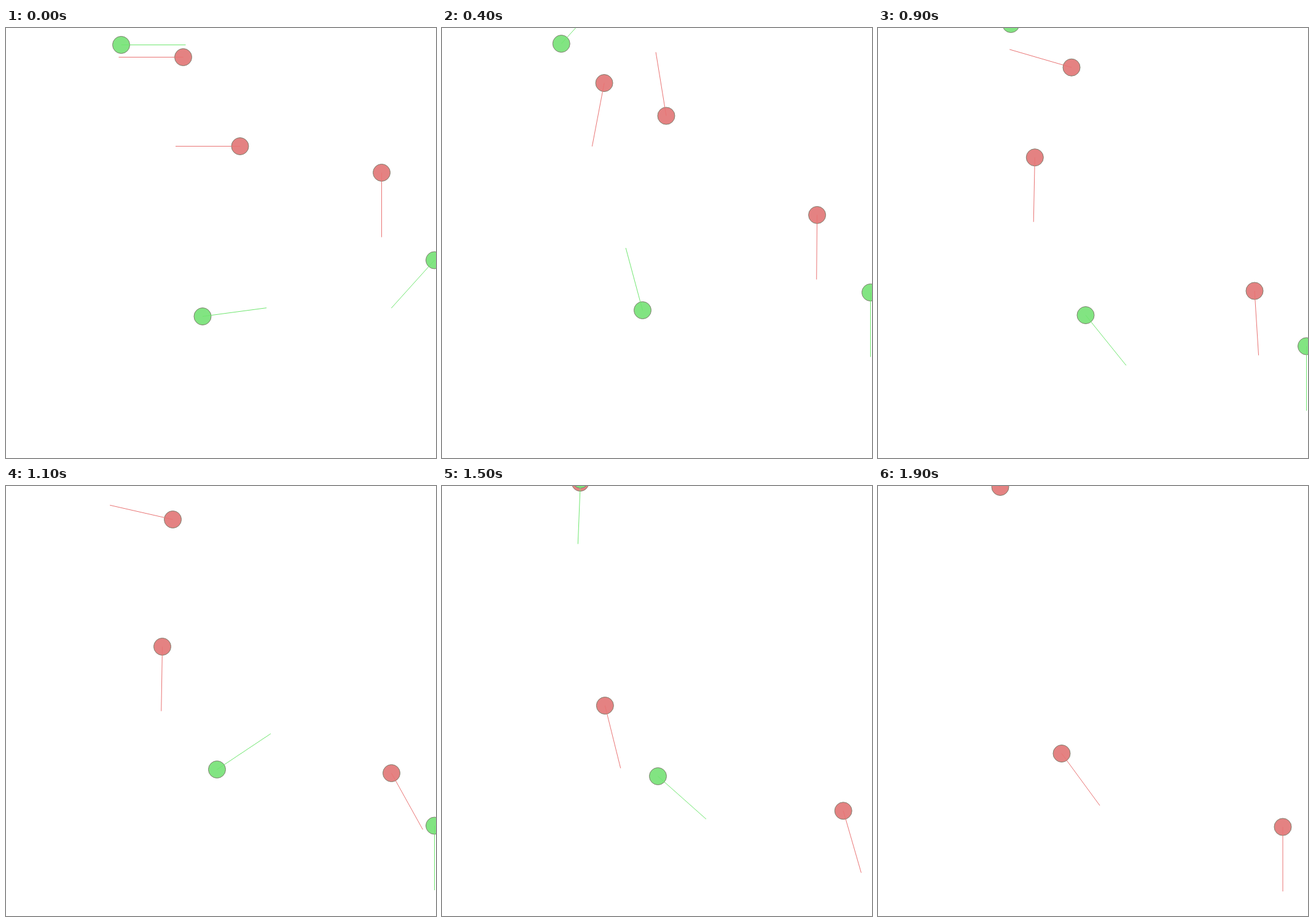
Write an HTML page with a canvas that moves like this. It is 700 px wide and 700 px high and loops after 2000 ms.

```html
<!DOCTYPE html>
<html lang="en">
<head>
<meta charset="utf-8">
<title>Pursuit</title>
<style>
  html, body { margin: 0; width: 100%; height: 100%; overflow: hidden; background: #fff; }
  canvas { display: block; }
</style>
</head>
<body>
<canvas id="stage" width="700" height="700"></canvas>
<script>
const ctx = document.getElementById('stage').getContext('2d');
const STEP_MS = 100, STEPS = 20, RADIUS = 14, SIGHT = 105;
const RED = { fill: '#e48282', line: '#e97474' };
const GREEN = { fill: '#82e482', line: '#70e670' };

// A key point: where an agent is at a step and how far it moves per step.
const at = (step, x, y, vx, vy) => ({ step, x, y, vx, vy });

// Hunters come first, so that the hunted are drawn over them.
const agents = [
  { color: RED, last: 19, path: [
    at(0, 288, 47, -9, 0), at(11, 254, 261, -0.4, 24), at(19, 298.5, 435, 11, 15)] },
  { color: RED, last: 19, path: [
    at(0, 380.5, 192, -6, 0), at(6, 356.5, 100, -5, -21), at(11, 271, 54, -22, -5),
    at(15, 224.5, -6, -1, -9), at(19, 198.5, 1, -6, -3)] },
  { color: RED, last: 19, path: [
    at(0, 611, 235, 0, 10), at(9, 612.5, 427.5, 1.5, 24), at(11, 627, 467, 10, 18),
    at(19, 658.5, 554.5, 0, 0.5)] },
  { color: GREEN, last: 15, path: [
    at(0, 187, 27, 3, 0), at(6, 201.5, 16, 6, -7), at(15, 225, -11, -0.4, 10)] },
  { color: GREEN, last: 17, path: [
    at(0, 319.5, 469, 3, -0.4), at(4, 326, 459, -0.7, -2.6), at(9, 337.5, 467, 2.5, 3.1),
    at(11, 343, 461, 3, -2), at(15, 351, 472, 2.7, 2.4)] },
  { color: GREEN, last: 12, path: [
    at(0, 697, 377.5, -0.9, 1), at(4, 697, 430, 0, 17.5)] },
];

// Position and speed on the cubic between two values with given end speeds.
function cubic(p0, p1, v0, v1, span, u) {
  const w = 1 - u;
  return [
    w * w * (1 + 2 * u) * p0 + u * u * (3 - 2 * u) * p1 + span * u * w * (w * v0 - u * v1),
    6 * u * w * (p1 - p0) / span + w * (1 - 3 * u) * v0 + u * (3 * u - 2) * v1
  ];
}

function poseAt(path, step) {
  const next = path.findIndex(key => key.step > step);
  if (next < 0) {
    // Past the last key point the agent coasts.
    const end = path[path.length - 1], dt = step - end.step;
    return { x: end.x + end.vx * dt, y: end.y + end.vy * dt, heading: Math.atan2(end.vy, end.vx) };
  }
  const a = path[next - 1], b = path[next];
  const span = b.step - a.step, u = (step - a.step) / span;
  const [x, vx] = cubic(a.x, b.x, a.vx, b.vx, span, u);
  const [y, vy] = cubic(a.y, b.y, a.vy, b.vy, span, u);
  return { x, y, heading: Math.atan2(vy, vx) };
}

function drawAgent({ color, path }, step) {
  const { x, y, heading } = poseAt(path, step);
  ctx.beginPath();
  ctx.arc(x, y, RADIUS, 0, 2 * Math.PI);
  ctx.fillStyle = color.fill;
  ctx.fill();
  ctx.strokeStyle = '#7f8070';
  ctx.stroke();
  ctx.beginPath();
  ctx.moveTo(x, y);
  ctx.lineTo(x + SIGHT * Math.cos(heading), y + SIGHT * Math.sin(heading));
  ctx.strokeStyle = color.line;
  ctx.stroke();
}

function frame() {
  const step = Math.floor(performance.now() / STEP_MS) % STEPS;
  ctx.setTransform(1, 0, 0, 1, 0, 0);
  ctx.fillStyle = '#fff';
  ctx.fillRect(0, 0, 700, 700);
  ctx.translate(0.5, 0.5);
  for (const agent of agents) if (step <= agent.last) drawAgent(agent, step);
  requestAnimationFrame(frame);
}
frame();
</script>
</body>
</html>
```
